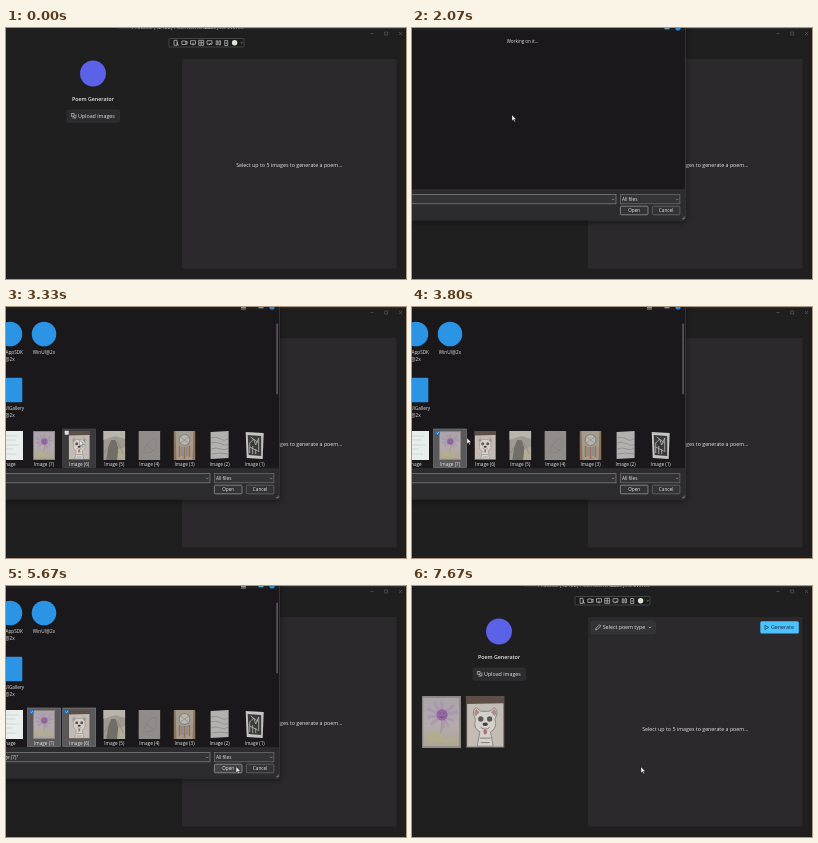
These frames come from a looping animation (400 px wide and 251 px high, 8 s). An HTML page:

```html
<!DOCTYPE html>
<html lang="en">
<head>
<meta charset="utf-8">
<title>Poem Generator</title>
<style>
  html, body { margin: 0; width: 100%; height: 100%; overflow: hidden; background: #201f20; }
  svg { display: block; }
  #stage { width: 400px; height: 251px; }
  text { font: 5.3px "Open Sans", "Noto Sans", sans-serif; fill: #e4e4e4; }
  .small { font-size: 4.7px; }
  .busy { font-size: 4.5px; }
  .bold { font-weight: 600; }
  .mid { text-anchor: middle; }
  .end { text-anchor: end; }
  .line { fill: none; stroke: #c8c8c8; stroke-width: .7; }
  .faint { stroke: #59585a; }
  .ink { fill: none; stroke: #77747a; stroke-width: .5; }
</style>
</head>
<body>
<svg id="stage" viewBox="0 0 400 251">
  <defs>
    <clipPath id="listClip"><rect y="3" width="273" height="158.5"/></clipPath>
    <filter id="shadow" x="-10%" y="-10%" width="120%" height="125%" color-interpolation-filters="sRGB">
      <feDropShadow dx="0" dy="2" stdDeviation="3" flood-color="#000" flood-opacity=".4"/>
    </filter>
    <linearGradient id="paper" x2="0" y2="1">
      <stop offset="0" stop-color="#aaa3a9"/><stop offset=".55" stop-color="#b3abad"/><stop offset="1" stop-color="#aca698"/>
    </linearGradient>

    <symbol id="flower" viewBox="0 0 22 29" preserveAspectRatio="none">
      <rect width="22" height="29" fill="#8b8683"/>
      <rect x=".7" y="1" width="20.3" height="27" fill="url(#paper)"/>
      <path d="M3 7 18 14M5 16 18 5M11 3 12 18M3 12 20 9M7 4 15 17" stroke="#a384b4" stroke-width="1.8" opacity=".4"/>
      <circle cx="11.3" cy="10.5" r="3.2" fill="#94699f"/>
      <path d="M9.8 9.6h.7M12 9.6h.7M9.8 11.5q1.5 1.2 3 0" stroke="#67477a" stroke-width=".5" fill="none"/>
      <path d="M11.5 14.5 10.5 21" stroke="#929a84" stroke-width=".5"/>
      <path d="M3 21q5-3 8 1t8 0v4H3z" fill="#b9b174" opacity=".4"/>
    </symbol>
    <symbol id="dog" viewBox="0 0 22 29" preserveAspectRatio="none">
      <rect width="22" height="29" fill="#5d4f48"/>
      <path d="M.8 4.5 21.3 4V28.3H.8z" fill="#c3bcb4"/>
      <path d="M5.5 13Q3 8 6 6.5L8.5 8.5H13.5L16 6.5Q19 8 16.5 13 18 18 14 20L15.5 28H6.5L8 20Q4 18 5.5 13Z" fill="#d5d0c9" stroke="#858086" stroke-width=".5"/>
      <path d="M5.5 11.5Q4 8.5 6 7.2L7.8 9zM16.5 11.5Q18 8.5 16 7.2L14.2 9z" fill="#a5908c"/>
      <circle cx="8.5" cy="12.8" r="1.5" fill="#5c5859"/><circle cx="13.5" cy="12.8" r="1.5" fill="#5c5859"/>
      <ellipse cx="11" cy="15.8" rx="1.5" ry="1" fill="#403c3e"/>
      <path d="M8.5 17.5Q11 19.5 13.5 17.5M8 23.5h6M8.5 26h5" class="ink"/>
      <ellipse cx="11" cy="20" rx="1" ry="1.5" fill="#b06a68"/>
    </symbol>
    <symbol id="figure" viewBox="0 0 22 29" preserveAspectRatio="none">
      <rect width="22" height="29" fill="#9e9a92"/>
      <path d="M0 0H22V8L12 5 0 9z" fill="#b9b5aa"/>
      <path d="M3 29 5 16 8 9 12 9 15 17 14 29z" fill="#716e68"/>
      <path d="M15 18 22 16V29H14z" fill="#b0aa98"/>
      <path d="M12 9 17 16 20 23M5 16 1 22" class="ink"/>
    </symbol>
    <symbol id="sketch" viewBox="0 0 22 29" preserveAspectRatio="none">
      <rect width="22" height="29" fill="#918c89"/>
      <path d="M5 22Q8 11 14 8T17 18Q12 23 6 22M8 14 17 21" fill="none" stroke="#817c7b" stroke-width=".5"/>
    </symbol>
    <symbol id="catcher" viewBox="0 0 22 29" preserveAspectRatio="none">
      <rect width="22" height="29" fill="#8d7259"/>
      <path d="M2 0H20L19 29H3z" fill="#a49b8c"/>
      <circle cx="11" cy="9" r="5.5" fill="#bcb5aa" stroke="#758791" stroke-width="1.2"/>
      <path d="M7 6 15 12M15 6 7 12" class="ink"/>
      <path d="M6 15V26M11 16V28M16 15V26" stroke="#a06b55" stroke-width="1.6"/>
      <path d="M8.5 16V25M13.5 16V25" stroke="#6f8a93" stroke-width="1.3"/>
    </symbol>
    <symbol id="waves" viewBox="0 0 22 29" preserveAspectRatio="none">
      <path d="M2 1 20 0V27L2 28z" fill="#b2b1af"/>
      <path d="M2 7Q8 5 12 8T20 7M2 12Q7 10 13 13T20 12M2 18Q8 16 12 18T20 17M3 23Q10 21 20 23" class="ink"/>
    </symbol>
    <symbol id="cityscape" viewBox="0 0 22 29" preserveAspectRatio="none">
      <path d="M2 1 20 2 19 28 3 27z" fill="#c4c4c2"/>
      <path d="M4 4 17.5 5V25L5 24z" fill="#3b3b3c"/>
      <path d="M6 22V12L10 8 12 14 15 7V21M6 16 14 20M7 6 15 12M9 23V15M12 23V18" fill="none" stroke="#b9b9b7" stroke-width=".8"/>
    </symbol>
    <symbol id="page" viewBox="0 0 22 29" preserveAspectRatio="none">
      <rect width="22" height="29" fill="#e9eeed"/>
      <path d="M3 5H18M3 9H16M3 14H19M3 18H14M3 23H17" stroke="#c0d3cc" stroke-width=".7"/>
    </symbol>
  </defs>

  <rect width="400" height="251" fill="#201f20"/>
  <rect x="112" width="288" height=".8" fill="#38373a"/>
  <text x="126" y="1.2" fill-opacity=".75">Process: [12122] PoemGenerator</text>
  <text x="199" y="1.2" fill-opacity=".75">Lifecycle Events</text>
  <path class="line faint" d="M364.5 5.5h3M378.7 4h3v3h-3zM393 4l3 3m0-3-3 3"/>
  <rect x="176" y="31" width="214.5" height="209.5" rx="1" fill="#2b292b"/>

  <g id="toolbar">
    <rect x="163" y="10.5" width="75" height="8.5" rx="1" fill="#1c1c1d" stroke="#535355" stroke-width=".7"/>
    <path class="line" d="M168 12.3h3v5h-3zM171.5 14v3h1.5M175.8 13h4v3.5h-4zM179.8 14l1.3-1v3.5l-1.3-1M184.5 12.7h5v3.5h-5zM187 14.5v3M192.7 12.3h5v5h-5zM195.2 12.3v5M192.7 14.8h5M201 12.7h5v3.5h-5zM203 17.3l2-2.5M210.2 12.8h1.6v4h-1.6zM213 12.8h1.6v4H213zM218.7 12.5h3v5h-3zM220.2 14v2M234.7 14.3l.8.8.8-.8"/>
    <circle cx="228.6" cy="14.8" r="2.7" fill="#d9e7d2"/>
  </g>

  <circle cx="87" cy="45.5" r="13" fill="#5b62e8"/>
  <text class="mid bold" x="87" y="73.2">Poem Generator</text>

  <g id="upload">
    <rect id="uploadBox" x="61" y="82" width="52.5" height="12.3" rx="1.6" stroke="#353437" stroke-width=".6"/>
    <g id="uploadFace">
      <path class="line" d="M65.4 85.5h2.7v2.8h-2.7zM66.4 90h3.5v-3.5M67 88l1.7 1.5"/>
      <text x="72" y="90.1">Upload images</text>
    </g>
  </g>

  <text id="hint" class="mid" x="283.3" y="138.8">Select up to 5 images to generate a poem...</text>

  <g id="options">
    <rect x="179" y="35.3" width="64.5" height="12.5" rx="1.6" fill="#343335" stroke="#3d3c3f" stroke-width=".6"/>
    <path class="line" d="M183.5 44l.6-1.8 3.5-3.5 1.2 1.2-3.5 3.5z"/>
    <text x="190.7" y="43.4">Select poem type</text>
    <path class="line" d="M236.8 40.8l1.2 1.2 1.2-1.2"/>
    <rect x="348.3" y="35.3" width="38.5" height="12.3" rx="1.6" fill="#4cc2ff"/>
    <path class="line" style="stroke:#173545" d="M353 39.3v4.2l3.6-2.1z"/>
    <text x="359" y="43.3" style="fill:#102a38">Generate</text>
  </g>

  <g id="photos">
    <use href="#flower" x="10" y="110" width="39" height="52"/>
    <use href="#dog" x="53.7" y="110" width="39" height="52"/>
  </g>

  <g id="dialog">
    <rect x="-30" y="-20" width="303.5" height="212" rx="2" fill="#1a181a" stroke="#444346" stroke-width=".7" filter="url(#shadow)"/>
    <rect width="273" height="2.6" fill="#202022"/>
    <rect x="252.5" width="5" height="1.3" fill="#69a6b5"/>
    <circle cx="266" cy="0" r="2.6" fill="#2c8bd8"/>
    <text id="busy" class="busy mid" x="110.5" y="15.3">Working on it...</text>
    <g id="files">
      <path class="line" d="M235 .5h5M235 2h5"/>
      <g clip-path="url(#listClip)"><g id="list"></g></g>
      <rect id="thumb" x="270.6" y="10" width=".9" height="71" rx=".4" fill="#8b8b8c"/>
    </g>
    <path d="M0 161.8H273.2V191.7H0z" fill="#2c2b2d"/>
    <path d="M0 161.8H273" stroke="#3c3b3e" stroke-width=".6"/>
    <rect x="-4" y="166.5" width="208" height="9.3" fill="#343336" stroke="#858488" stroke-width=".7"/>
    <rect x="208.4" y="166.5" width="59.5" height="9.3" fill="#343336" stroke="#737276" stroke-width=".7"/>
    <path class="line" style="stroke:#99989b" d="M200 170.8l1.2 1.2 1.2-1.2M264.1 170.8l1.2 1.2 1.2-1.2"/>
    <text id="names" class="small end" x="12.3" y="172.9">"Image (6)" "Image (7)"</text>
    <text class="small" x="210" y="172.9">All files</text>
    <rect id="openBox" x="208.4" y="178.2" width="27.6" height="8.6" rx="1" stroke="#a4a3a6" stroke-width=".7"/>
    <rect x="240.3" y="178.2" width="27.6" height="8.6" rx="1" fill="#333235" stroke="#737276" stroke-width=".7"/>
    <text class="small mid" x="222.2" y="184.2">Open</text>
    <text class="small mid" x="254.1" y="184.2">Cancel</text>
    <path d="M270 190.8h2.2v-2.2" stroke="#99989b" stroke-width=".7" fill="none"/>
  </g>

  <path id="cursor" d="M0 0V5.7L1.4 4.5 2.4 6.8 3.3 6.4 2.3 4.2H4.1Z" fill="#fff" stroke="#222" stroke-width=".35"/>
</svg>

<script>
const LOOP = 8000;
const $ = id => document.getElementById(id);
const show = (id, on) => $(id).setAttribute('opacity', +on);
const clamp = v => Math.min(1, Math.max(0, v));
const ramp = (t, from, to) => clamp((t - from) / (to - from));
const ease = p => p * p * (3 - 2 * p);

// File list, laid out at its final scroll position
const label = (x, y, s) => `<text class="small mid" x="${x}" y="${y}">${s}</text>`;
const appFile = (x, y, name, round) =>
  `<rect x="${x - 12.3}" y="${y - 12.3}" width="24.6" height="24.6" rx="${round}" fill="#2b94e5"/>` +
  label(x, y + 20.3, name);
const pick = (n, x) =>
  `<rect id="row${n}" x="${x - 16.5}" y="122" width="33" height="38.5" stroke-width=".6"/>`;
const tick = (n, x) =>
  `<g id="tick${n}"><rect id="box${n}" x="${x - 14.5}" y="123.7" width="4" height="4" rx=".6"/>` +
  `<path id="mark${n}" d="M${x - 13.6} 125.7l.9.9 1.5-1.7" fill="none" stroke="#fff" stroke-width=".5"/></g>`;

const kinds = ['page', 'flower', 'dog', 'figure', 'sketch', 'catcher', 'waves', 'cityscape'];
const column = i => 3 + 35.1 * i;
$('list').innerHTML =
  appFile(4, 27, 'WinAppSDK', 12.3) + label(4, 53.6, '@2x') +
  appFile(38, 27, 'WinUI@2x', 12.3) +
  appFile(4, 83, 'WinUIGallery', 1) + label(4, 109.6, '@2x') +
  pick(7, column(1)) + pick(6, column(2)) +
  kinds.map((kind, i) => {
    const x = column(i);
    const w = i ? 22 : 28;
    return `<use href="#${kind}" x="${x - w / 2}" y="124" width="${w}" height="29"/>` +
      label(x, 159, i ? `Image (${8 - i})` : 'Image');
  }).join('') +
  tick(7, column(1)) + tick(6, column(2));

// time, x, y
const path = [
  [70, 305, 241], [870, 113, 101], [1250, 100, 87], [2330, 100, 87],
  [2620, 79, 134], [3250, 79, 134], [3520, 55, 131], [3900, 55, 131],
  [4350, 61, 125], [5000, 61, 125], [5700, 231, 181], [7600, 231, 181], [7670, 229, 181]
];

function pointer(t) {
  const i = path.findIndex(p => p[0] > t);
  if (i < 0) return path[path.length - 1].slice(1);
  if (i === 0) return path[0].slice(1);
  const [t0, x0, y0] = path[i - 1], [t1, x1, y1] = path[i];
  const p = ease((t - t0) / (t1 - t0));
  return [x0 + (x1 - x0) * p, y0 + (y1 - y0) * p];
}

function drawPick(n, hover, chosen) {
  const row = $('row' + n);
  row.setAttribute('fill', chosen ? '#59585a' : '#3b3a3c');
  row.setAttribute('stroke', chosen ? '#7f8488' : '#4c4b4d');
  show('row' + n, hover || chosen);
  show('tick' + n, hover || chosen);
  $('box' + n).setAttribute('fill', chosen ? '#1976c9' : '#dededf');
  show('mark' + n, chosen);
}

function render(t) {
  const [x, y] = pointer(t);
  $('cursor').setAttribute('transform', `translate(${x} ${y})`);
  show('cursor', t >= 70);

  const listed = t >= 2400;
  const open = t < 4000 ? ramp(t, 1790, 1930) : 1 - ramp(t, 5860, 5980);
  const grow = .96 + .04 * ease(open);
  $('dialog').setAttribute('opacity', open);
  $('dialog').setAttribute('transform', `translate(120 90) scale(${grow}) translate(-120 -90)`);
  show('busy', !listed);
  show('files', listed);

  const scroll = ease(ramp(t, 2680, 2950));
  $('list').setAttribute('transform', `translate(0 ${5.5 * (1 - scroll)})`);
  $('thumb').setAttribute('y', 10 + 6.5 * scroll);

  const overList = listed && y > 122 && y < 160;
  drawPick(7, overList && x > 22 && x < 56, t >= 3600);
  drawPick(6, overList && x > 57 && x < 90, t >= 4470);
  show('names', t >= 4530);
  const overOpen = open > 0 && x > 208 && x < 236 && y > 178 && y < 187;
  $('openBox').setAttribute('fill', overOpen ? '#434246' : '#333235');

  const waiting = t >= 1600 && t < 6870;
  const overUpload = t < 1600 && x > 61 && x < 113 && y > 82 && y < 94;
  $('uploadBox').setAttribute('fill', waiting ? '#29282a' : overUpload ? '#343336' : '#2c2b2d');
  show('uploadFace', waiting ? .42 : 1);
  show('options', ease(ramp(t, 6840, 7070)));
  $('hint').setAttribute('y', t < 6870 ? 138.8 : 144.5);
  show('photos', ramp(t, 7240, 7400));
}

const start = performance.now();
function frame() {
  render((performance.now() - start) % LOOP);
  requestAnimationFrame(frame);
}
frame();
</script>
</body>
</html>
```
